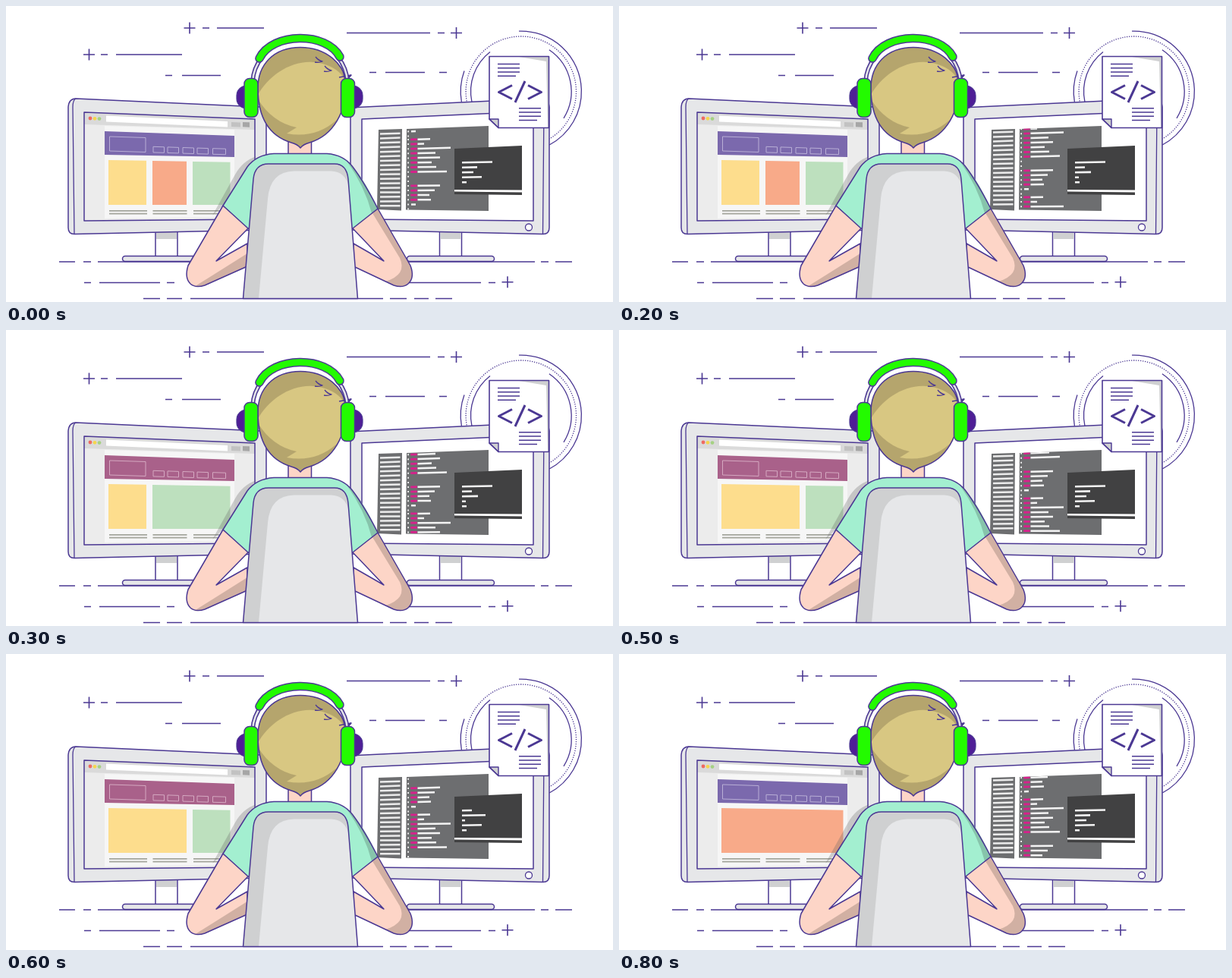
Write an HTML page with a canvas that moves like this. It is 800 px wide and 390 px high and loops after 900 ms.

```html
<!DOCTYPE html>
<html lang="en">
<head>
<meta charset="utf-8">
<title>Developer at work</title>
<style>
html, body { margin: 0; width: 100%; height: 100%; overflow: hidden; background: #fff; }
canvas { display: block; width: 800px; height: 390px; }
</style>
</head>
<body>
<canvas id="stage" width="800" height="390"></canvas>
<script>
const ctx = document.getElementById('stage').getContext('2d');
const INK = '#4b3893', FRAME = '#e6e7e9', SHADE = '#cfd0d1';
const SKIN = '#fdd5c7', SKIN_DARK = '#d1b0a3', GREEN = '#23fb00';
const YELLOW = '#fddd8d', ORANGE = '#f8aa89', MINT = '#bde0be';
const STEP = 100, STEPS = 9, SCROLL = 10;

function shape(d, fill, line = 1.5) {
  const p = new Path2D(d);
  if (fill) { ctx.fillStyle = fill; ctx.fill(p); }
  if (line) {
    ctx.strokeStyle = INK;
    ctx.lineWidth = line;
    ctx.stroke(p);
  }
}

function box(x, y, w, h, fill, r = 0, line = 0) {
  ctx.beginPath();
  ctx.roundRect(x, y, w, h, r);
  ctx.fillStyle = fill;
  ctx.fill();
  if (line) { ctx.strokeStyle = INK; ctx.lineWidth = line; ctx.stroke(); }
}

function dot(x, y, r, fill) {
  ctx.beginPath();
  ctx.arc(x, y, r, 0, 7);
  ctx.fillStyle = fill;
  ctx.fill();
}

function ring(r, from, to) {
  ctx.beginPath();
  ctx.arc(678.8, 112.7, r, from * Math.PI / 180, to * Math.PI / 180);
  ctx.strokeStyle = INK;
  ctx.lineWidth = 1.3;
  ctx.stroke();
}

function dashes(y, ...ends) {
  let d = '';
  for (let i = 0; i < ends.length; i += 2) d += `M${ends[i]} ${y}H${ends[i + 1]}`;
  shape(d, null, 1.6);
}

function plus(x, y) {
  shape(`M${x - 7.5} ${y}h15M${x} ${y - 7.5}v15`, null, 1.6);
}

function backdrop() {
  dashes(29, 259, 268, 278, 340);
  dashes(64, 125, 134, 145, 232);
  dashes(91.5, 210, 219, 232, 283);
  dashes(35.5, 449, 559, 569, 578);
  dashes(87.5, 479, 488, 500, 552, 571, 581);
  dashes(337, 70, 91, 102, 112, 121, 300, 480, 697, 705, 715, 724, 746);
  dashes(364.5, 103, 112, 123, 203, 212, 222, 525, 626, 636, 645);
  dashes(385.5, 181, 203, 212, 232, 243, 497, 506, 528, 538, 557, 566, 588);
  plus(242, 29);
  plus(109.5, 64);
  plus(593.5, 35.5);
  plus(661, 363.7);
}

function stand(neck, base) {
  box(neck, 296, 29, 34, '#fff', 0, 1.5);
  box(neck + 1, 298, 27, 9, SHADE);
  box(base, 329.5, 115, 7, FRAME, 3.5, 1.5);
}

function browser(layout) {
  const magenta = layout === 1 || layout === 2;
  shape('M103 140L328 149V283H103Z', '#ececec', 0);
  shape('M103 140L328 149V163L103 156Z', '#dadada', 0);
  shape('M132 144.5L292 152V159.5L132 152.5Z', '#fff', 0);
  shape('M297 153L309 153.5V159.5L297 159Z', '#c2c2c2', 0);
  shape('M312 153L321 153.3V159.8L312 159.3Z', '#a6a6a6', 0);
  dot(111, 148, 2.4, '#ef6a62');
  dot(117, 148.3, 2.4, '#f5d64e');
  dot(123, 148.6, 2.4, '#a5d183');

  shape('M130 158L301 163V278L130 280Z', '#f6f6f6', 0);
  shape('M130 165L301 171V199L130 196Z', magenta ? '#a9618a' : '#7b69ad', 0);
  ctx.strokeStyle = magenta ? '#d5a9c1' : '#b9afd6';
  ctx.lineWidth = 1;
  ctx.stroke(new Path2D('M136.5 172L184 173.5V192.5L136.5 191Z'));
  [194, 213, 233, 252, 272.5].forEach((x, i) => {
    const y = 185.3 + i * .6, w = i === 4 ? 17 : 14.5;
    ctx.stroke(new Path2D(`M${x} ${y}l${w} .5v7.5l${-w} -.4Z`));
  });

  const cards = [
    [[135, 185, YELLOW], [193, 238, ORANGE], [246, 295.5, MINT]],
    [[135, 185, YELLOW], [193, 295.5, MINT]],
    [[135, 238, YELLOW], [246, 295.5, MINT]],
    [[135, 295.5, ORANGE]]
  ][layout];
  const top = x => 203 + (x - 135) * .017;
  for (const [a, b, fill] of cards) {
    shape(`M${a} ${top(a)}L${b} ${top(b)}V262H${a}Z`, fill, 0);
  }
  for (const [x, w] of [[136, 50], [193.5, 45], [247, 46]]) {
    box(x, 269, w, 1.8, '#a3a59c');
    box(x, 272.8, w, 1.8, '#a3a59c');
  }
}

function leftMonitor(layout) {
  stand(197, 153.5);
  shape('M92 122L335 133Q343 133.5 343 142V295L90 300.5Q82 300.5 82 292V133Q83 122 92 122Z', FRAME);
  shape('M92 122Q88 124 88 133L90 300', null, 1.3);
  browser(layout);
  shape('M103 140L328 149V281L103 283Z');
}

// Right end of each code line; 0 is blank.
const lineEnds = [559, 551, 586, 566, 572, 561, 567, 581, 0, 0, 572, 565, 558, 560, 540, 0];
const PITCH = 6.1, PERIOD = 96;

function bar(x1, x2, y, fill, h = 2.5) {
  const slope = -.035 * Math.max(0, 1 - (y - 160) / 109);
  const rise = (x2 - x1) * slope;
  const y0 = y + (x1 - 530) * slope - h / 2;
  shape(`M${x1} ${y0}L${x2} ${y0 + rise}v${h}L${x1} ${y0 + h}Z`, fill, 0);
}

function inPanel(d, paint) {
  const panel = new Path2D(d);
  ctx.save();
  ctx.fillStyle = '#6d6e70';
  ctx.fill(panel);
  ctx.clip(panel);
  paint();
  ctx.restore();
}

function sidebar(step) {
  const gap = 6, first = 167.3 - step * SCROLL % gap;
  for (let y = first; y < 267; y += gap) {
    if (y > 165) bar(493, 519.5, y, '#ececec');
  }
}

function code(step) {
  for (let turn = -1; turn < 3; turn++) {
    lineEnds.forEach((end, i) => {
      const y = 176 + turn * PERIOD + i * PITCH - step * SCROLL;
      if (y < 160 || y > 270) return;
      bar(529.2, 531, y, '#f4f4f4', 2);
      if (end === 540) bar(534, end, y, '#f4f4f4');
      else if (end) {
        bar(533.3, 541.7, y, '#d8208c', 2.8);
        bar(542.5, end, y, '#f4f4f4');
      }
    });
  }
}

const prompts = [[641, 621, 616, 627, 607], [641, 614, 622, 606, 607], [614, 632, 605, 627, 607]];

function terminal(step) {
  shape('M591 188L680 184V249L591 248Z', '#414142', 0);
  shape('M591 242L680 242.5V245.5L591 244.5Z', '#fff', 0);
  const state = [0, 1, 0, 2, 0][Math.floor(step / 2)];
  prompts[state].forEach((end, i) => {
    const y = 205 + i * 6.5;
    shape(`M601 ${y}L${end} ${y - (end - 601) * .02}v2.6L601 ${y + 2.6}Z`, '#f4f4f4', 0);
  });
}

function rightMonitor(step) {
  stand(571.5, 528.5);
  shape('M454 295V141Q454 134 462 133.5L705 122Q715 122 716 133V292Q716 300.5 708 300.5Z', FRAME);
  shape('M705 122Q709 125 709 133L707.5 300', null, 1.3);
  shape('M469 149L695 139V283L469 281Z', '#fff');
  box(684.5, 287, 9, 9, '#fff', 4.5, 1.3);
  inPanel('M491 163L522 162L521 269.5L489 268Z', () => sidebar(step));
  inPanel('M528 162L636 158V270L527 268.5Z', () => code(step));
  terminal(step);
}

function rings() {
  ring(79.6, -92, 62);
  ring(79.6, 170, 200);
  ring(66.3, -56, 32);
  ring(66.3, 168, 232);
  ctx.setLineDash([1.3, 1.7]);
  ring(72.7, 170, 419);
  ctx.setLineDash([]);
}

function sheet() {
  const page = 'M637 66.5H715.5V160.5H649L637 149Z';
  shape(page, '#fff', 0);
  shape('M676 67H715V160H714L712 73Z', SHADE, 0);
  shape('M637 149H649V160.5Z', SHADE, 1.4);
  shape(page, null, 1.6);
  shape('M648 76.5H677M648 81.7H677M648 87H677M648 92.2H672', null, 1.4);
  shape('M676 134.7H705M676 140H705M676 145.2H705M676 150.5H700', null, 1.4);
  shape('M667 104.5L649.5 113.5L667 122.5M684 99L671 127M688 104.5L705.5 113.5L688 122.5', null, 3);
}

function arms() {
  // Soft shadow cast on the left screen.
  shape('M330 198Q312 204 302 222L272 276L286 263L318 212Z', 'rgba(95,95,95,.28)', 0);
  const left = 'M286 263L240 342Q235 358 243 366Q250 372 262 368L318 343V313L277 336L320 292Z';
  const right = 'M490 267L533 342Q539 358 530 366Q523 372 511 368L458 343V313L498 336L456 292Z';
  shape(left, SKIN, 0);
  shape('M248 370Q280 350 318 326V343L262 368Q254 371 248 370Z', SKIN_DARK, 0);
  shape(left);
  shape(right, SKIN, 0);
  shape('M483 273L490 267L533 342Q539 358 530 366Q523 372 511 368L500 363Q529 354 519 332Z', SKIN_DARK, 0);
  shape(right);
}

function torso() {
  shape('M372 175H402.5V197H372Z', SKIN);
  const shirt = 'M353 194.5H423Q445 196 457 212Q472 232 490 267L457 293H319L286 263L318 212Q330 196 353 194.5Z';
  shape(shirt, '#a3efd0', 0);
  shape('M449 204Q470 222 490 267L482 273Q473 238 449 204Z', '#87c4ab', 0);
  shape(shirt);
}

function chair() {
  const back = 'M312.5 385.5L326 228Q328 208 346 208H433Q449 208 451 228L463.5 385.5Z';
  shape(back, SHADE, 0);
  shape('M333 385.5L345 254Q348 218 380 217.5H428Q448 218 452 239L463.5 385.5Z', FRAME, 0);
  shape(back);
}

function head() {
  const hair = 'M388 54.5C424 54.5 445 79 446 94L455 91L448 99C450 139 431 171 400 180Q392 182 388 187Q384 182 376 180C346 171 332 146 332 108C332 78 352 54.5 388 54.5Z';
  box(304, 105, 26, 30, '#4f1e96', 13, 1.2);
  box(444, 105, 26, 30, '#4f1e96', 13, 1.2);
  shape(hair, '#b5a56d', 0);
  ctx.save();
  ctx.clip(new Path2D(hair));
  shape('M330 121C344 92 380 66 417 76Q437 81 447 97L449 112Q446 136 436 150Q408 175 370 168L383 160Q350 153 331 121Z', '#d8c782', 0);
  ctx.restore();
  shape(hair);
  shape('M408 67Q412 72 417 73Q412 75 407 74M420 79Q424 84 429 85Q424 87 419 86M439 94L455 91', null, 1.3);
}

function band(d, width, fill) {
  const p = new Path2D(d);
  ctx.lineCap = 'round';
  for (const [w, c] of [[width + 3, INK], [width, fill]]) {
    ctx.lineWidth = w;
    ctx.strokeStyle = c;
    ctx.stroke(p);
  }
  ctx.lineCap = 'butt';
}

function headphones() {
  band('M325 99C326 86 330 77 337 68', 2.6, '#e4e4e8');
  band('M450 99C449 86 445 77 438 68', 2.6, '#e4e4e8');
  band('M334 69C351 34 423 34 440 67', 8.6, GREEN);
  box(314, 95.5, 18, 51, GREEN, 7, 1.5);
  box(441.5, 95.5, 18, 51, GREEN, 7, 1.5);
}

function draw(step) {
  ctx.fillStyle = '#fff';
  ctx.fillRect(0, 0, 800, 390);
  ctx.lineJoin = 'round';
  backdrop();
  leftMonitor(Math.floor(step * 4 / STEPS));
  rings();
  rightMonitor(step);
  sheet();
  arms();
  torso();
  chair();
  head();
  headphones();
}

let shown = -1;
function tick() {
  const step = Math.floor(performance.now() / STEP) % STEPS;
  if (step !== shown) draw(shown = step);
  requestAnimationFrame(tick);
}
tick();
</script>
</body>
</html>
```
